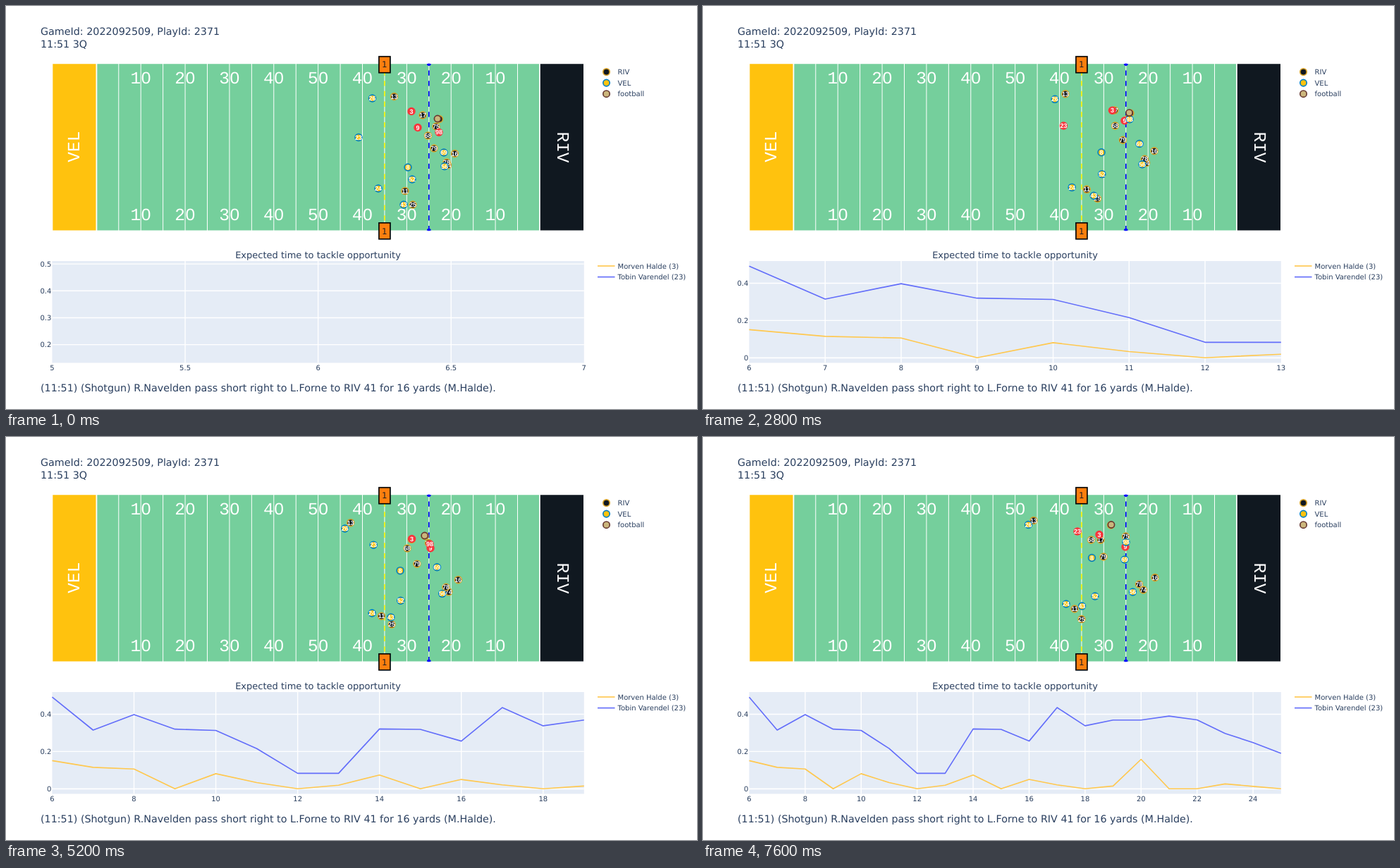
These frames come from a looping animation (980x572 px, 8 s). An HTML page:

```html
<!DOCTYPE html>
<html lang="en">
<head>
<meta charset="utf-8">
<title>Play animation</title>
<style>
html, body { margin: 0; width: 100%; height: 100%; overflow: hidden; background: #fff; }
svg { display: block; width: 980px; height: 572px; }
text { font-family: "DejaVu Sans", Verdana, sans-serif; fill: #2a3f5f; text-rendering: geometricPrecision; }
.head { font-size: 14.3px; }
.sub { font-size: 13px; }
.small { font-size: 10px; }
.flag { font-size: 12px; fill: #222; }
.yard { font: 24.5px "Liberation Mono", "Courier New", monospace; fill: #fff; }
.num { font: bold 9px "Liberation Sans", Arial, sans-serif; fill: #fff; }
</style>
</head>
<body>
<svg id="stage" viewBox="0 0 980 572"></svg>
<script>
const STEP = 400, STEPS = 20, FIRST = 6;
const GREEN = "#75cf9c", WIDTH = 1.65;
const FIELD = { x: 65.5, y: 81.4, w: 754.3, h: 237.9 };
const PLOT = { x: 65.5, y: 362, w: 754.3, h: 144.5 };
const YARD = FIELD.w / 120, BOTTOM = FIELD.y + FIELD.h;

const STYLE = {
  home: { fill: "#101820", stroke: "#d7a22a" },
  away: { fill: "#ffc20e", stroke: "#0080c6" },
  ball: { fill: "#cbb67c", stroke: "#663831" },
  near: { fill: "#f8363c", stroke: "#f8363c" }
};

// A run from (x, y) by (dx, dy), bowed out by (bx, by) halfway.
const run = (x, y, dx, dy, bx = 0, by = 0) => u => {
  const bow = 4 * u * (1 - u);
  return [x + dx * u + bx * bow, y + dy * u + by * bow];
};

const ball = run(612, 160, -33, -35.5, 5, 5);
const carrier = u => {
  const [x, y] = ball(u);
  return [x + 2.5 - 3 * u, y + .5];
};

const HOME = {
  7: carrier,
  11: run(566, 262.5, -39, -18.5, -8, 5),
  13: run(550.5, 128.5, -81.5, -10, -7),
  16: run(636.5, 209.5, 4.5, -10, 2),
  17: run(591, 155, -27, -9, 3, -4),
  25: run(577, 282, -40, -23.5, -3),
  68: run(598.5, 184, -48, -38, 4),
  74: run(626.5, 226, -2, -9, 3),
  75: run(610, 171, -10.5, -30, -4),
  78: run(625, 222, -6.5, -13, 4),
  79: run(607, 202, -39, -32, 3)
};
const AWAY = {
  3: run(575, 149.5, -13, -11, 11, 3),
  8: run(570, 229, -18.5, -57.5, 2),
  9: run(584, 172.5, 15, -16.5, 9, -4),
  23: run(500, 186.5, 31, -52.5, 0, 3),
  24: run(528, 259, -13, -22, 0, 7),
  26: run(519.5, 131, -58, -6.5, 1, 4),
  43: run(564, 282, -26.5, -42, 0, 3),
  52: run(576, 246, -20, -20, -3),
  56: run(622, 227.5, -12.5, -7.5, 6),
  69: run(621, 208, -23, -34, 7),
  98: run(614, 179.3, -14, -30, -4, -8)
};

// Thousandths of a second per step.
const SERIES = [
  { color: "#ffc84f", name: "Morven Halde (3)",
    data: [151, 115, 106, 0, 81, 33, 0, 19, 74, 0, 50, 21, 0, 15, 158, 0, 0, 26, 13, 0] },
  { color: "#636efa", name: "Tobin Varendel (23)",
    data: [492, 315, 398, 320, 313, 216, 83, 83, 321, 319, 256, 436, 338, 369, 369, 390, 370, 297, 248, 190] }
];

const stage = document.getElementById("stage");

function add(parent, tag, attrs, content) {
  const node = document.createElementNS("http://www.w3.org/2000/svg", tag);
  for (const key in attrs) node.setAttribute(key, attrs[key]);
  if (content !== undefined) node.textContent = content;
  parent.appendChild(node);
  return node;
}

function label(parent, x, y, cls, content, anchor = "start", extra = {}) {
  return add(parent, "text", { x, y, class: cls, "text-anchor": anchor, ...extra }, content);
}

function line(parent, x1, y1, x2, y2, stroke, width, extra = {}) {
  return add(parent, "line", { x1, y1, x2, y2, stroke, "stroke-width": width, ...extra });
}

function box(parent, x, y, width, height, fill, extra = {}) {
  return add(parent, "rect", { x, y, width, height, fill, ...extra });
}

function dot(parent, x, y, style, r = 4.9) {
  return add(parent, "circle", { cx: x, cy: y, r, "stroke-width": WIDTH, ...style });
}

const yardX = n => FIELD.x + n * YARD;

function drawZone(from, to, fill) {
  box(stage, yardX(from), FIELD.y, (to - from) * YARD, FIELD.h, fill,
    { stroke: "#fff", "stroke-width": WIDTH });
}

function drawDashes(n, color) {
  line(stage, yardX(n), BOTTOM, yardX(n), FIELD.y, color, WIDTH, { "stroke-dasharray": "7.35 7.35" });
}

function drawField() {
  drawZone(10, 110, GREEN);
  drawZone(0, 10, STYLE.away.fill);
  drawZone(110, 120, STYLE.home.fill);
  for (let n = 15; n < 110; n += 5) {
    line(stage, yardX(n), FIELD.y, yardX(n), BOTTOM, "#fff", 1);
  }
  for (let n = 20; n <= 100; n += 10) {
    for (const base of [109.8, 303.8]) {
      label(stage, yardX(n), base, "yard", 50 - Math.abs(n - 60), "middle");
      // plain zero, without the inner mark of the font
      add(stage, "ellipse", { cx: yardX(n) + 7.35, cy: base - 8.1, rx: 2.3, ry: 3.2, fill: GREEN });
    }
  }
  label(stage, 0, 0, "yard", "VEL", "middle", { transform: "translate(104 199.7) rotate(-90)" });
  label(stage, 0, 0, "yard", "RIV", "middle", { transform: "translate(781.5 200.5) rotate(90)" });

  drawDashes(75, "#f4f400");
  drawDashes(85, "#0000ff");
  const x = yardX(85) - 2.9;
  for (const [y, sweep] of [[FIELD.y + .6, 0], [BOTTOM - .6, 1]]) {
    add(stage, "path", { d: `M${x} ${y}a2.9 2.9 0 0 ${sweep} 5.8 0z`, fill: "#0000ff" });
  }
}

function drawFlags() {
  for (const mid of [83.2, 319.3]) {
    box(stage, yardX(75) - 8, mid - 11.5, 16, 23, "#ff7f0e", { stroke: "#000", "stroke-width": WIDTH });
    label(stage, yardX(75), mid + 4.2, "flag", "1", "middle");
  }
}

function drawTexts() {
  label(stage, 49, 41, "head", "GameId: 2022092509, PlayId: 2371");
  label(stage, 49, 59, "head", "11:51 3Q");
  label(stage, 442.5, 357.5, "sub", "Expected time to tackle opportunity", "middle");
  label(stage, 49, 546.7, "head",
    "(11:51) (Shotgun) R.Navelden pass short right to L.Forne to RIV 41 for 16 yards (M.Halde).");
  [["RIV", "home"], ["VEL", "away"], ["football", "ball"]].forEach(([name, kind], i) => {
    const y = 93.5 + i * 15.6;
    dot(stage, 851.5, y, STYLE[kind], 4.7);
    label(stage, 867.5, y + 3.7, "small", name);
  });
  SERIES.forEach((s, i) => {
    const y = 369 + i * 15.6;
    line(stage, 839, y, 863.5, y, s.color, WIDTH);
    label(stage, 867.5, y + 3.7, "small", s.name);
  });
}

function drawPlayers(step) {
  const u = step / (STEPS - 1);
  const near = ["3", "9", step % 12 === 7 ? "23" : "98"];
  const draw = (team, style) => {
    for (const id in team) {
      const [x, y] = team[id](u);
      dot(players, x, y, style(id));
      label(players, x, y + 3.1, "num", id, "middle");
    }
  };
  players.replaceChildren();
  draw(HOME, () => STYLE.home);
  draw(AWAY, id => near.includes(id) ? STYLE.near : STYLE.away);
  dot(players, ...ball(u), STYLE.ball, 4.6);
}

function ticks(from, to, size) {
  const list = [];
  for (let i = Math.ceil(from / size - 1e-6); i * size <= to + 1e-6; i++) {
    list.push(+(i * size).toFixed(2));
  }
  return list;
}

function drawChart(step) {
  chart.replaceChildren();
  const { x, y, w, h } = PLOT, bottom = y + h;
  const x0 = step ? FIRST : FIRST - 1, x1 = FIRST + Math.max(step, 1);
  const shown = SERIES.map(s => s.data.slice(0, step + 1).map(v => v / 1000));
  const all = shown.flat(), low = Math.min(...all), high = Math.max(...all);
  const pad = (high - low) / 18;
  const y0 = low - pad, y1 = high + pad;
  const px = v => x + (v - x0) / (x1 - x0) * w;
  const py = v => bottom - (v - y0) / (y1 - y0) * h;
  const xSize = [.2, .5, 1, 2].find(d => d > (x1 - x0) / 10 + 1e-9);
  const ySize = (y1 - y0) / 5.3 > .1 ? .2 : .1;

  box(chart, x, y, w, h, "#e5ecf6");
  for (const v of ticks(x0, x1, xSize)) {
    if (v > x0 && v < x1) line(chart, px(v), y, px(v), bottom, "#fff", 1.4);
    label(chart, px(v), 517.2, "small", v, "middle");
  }
  for (const v of ticks(y0, y1, ySize)) {
    line(chart, x, py(v), x + w, py(v), "#fff", v ? 1.4 : 1.8);
    label(chart, 64.3, py(v) + 3.7, "small", v, "end");
  }
  shown.forEach((data, i) => {
    const points = data.map((v, n) => px(FIRST + n).toFixed(2) + "," + py(v).toFixed(2)).join(" ");
    add(chart, "polyline", {
      points, fill: "none", stroke: SERIES[i].color, "stroke-width": WIDTH, "stroke-linejoin": "round"
    });
  });
}

drawField();
const players = add(stage, "g", {});
drawFlags();
const chart = add(stage, "g", {});
drawTexts();

const start = performance.now();
let last = -1;

function update(now) {
  const step = Math.floor(Math.max(0, now - start) / STEP) % STEPS;
  if (step !== last) {
    last = step;
    drawPlayers(step);
    drawChart(step);
  }
  requestAnimationFrame(update);
}
update(start);
</script>
</body>
</html>
```
